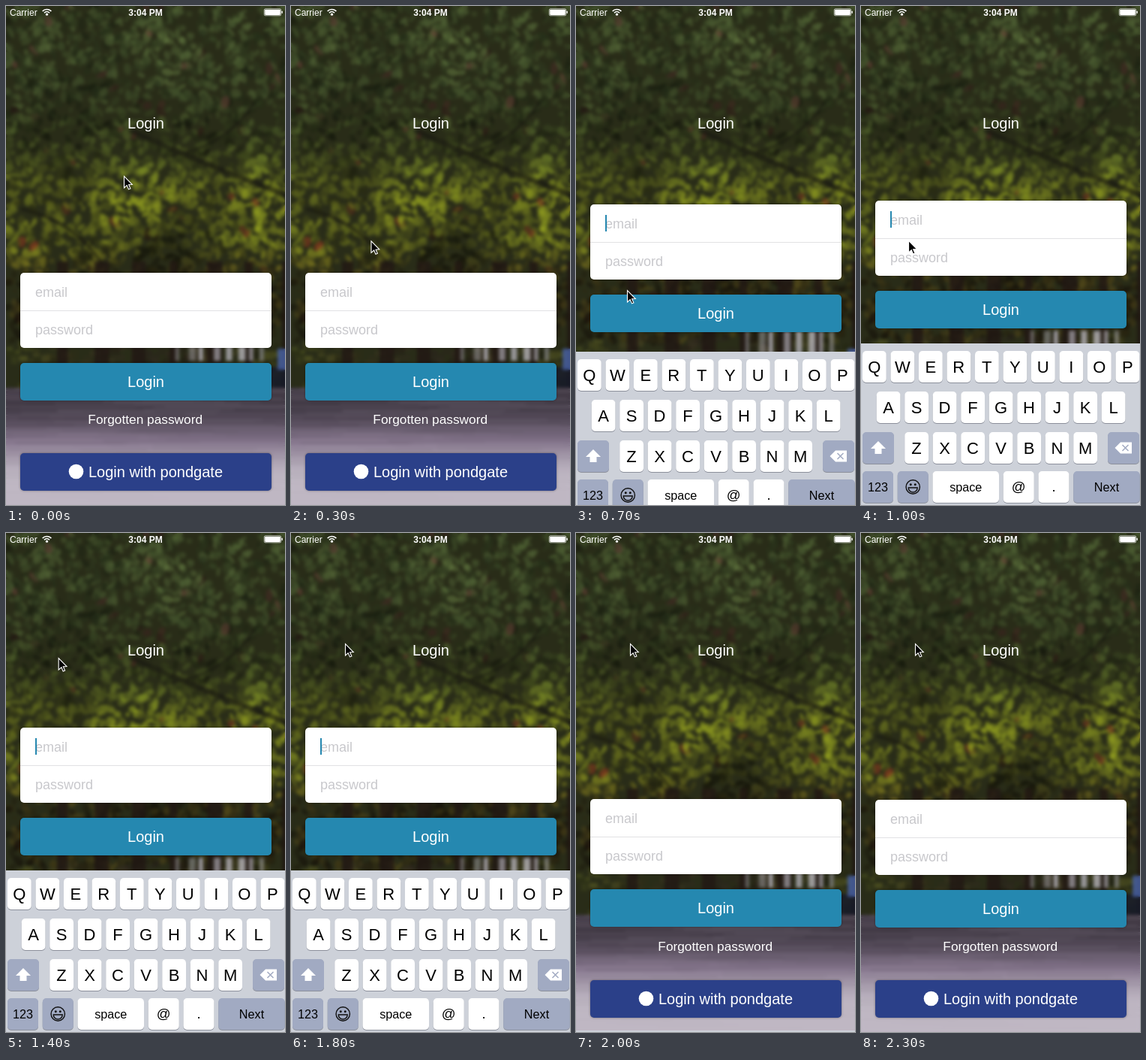
An HTML page with a canvas that plays this animation: 372 px wide and 664 px high, repeating every 2400 ms.

```html
<!DOCTYPE html>
<html lang="en">
<head>
<meta charset="utf-8">
<title>Login screen</title>
<style>
html, body { margin: 0; width: 100%; height: 100%; overflow: hidden; background: #2b3420; }
canvas { display: block; width: 372px; height: 664px; }
</style>
</head>
<body>
<canvas id="stage" width="372" height="664"></canvas>
<script>
const W = 372, H = 664, LOOP = 2400, STEP = 100;
const FONT = '"Liberation Sans", Arial, sans-serif';
const BLUE = '#2588b0', DIM = '#a1aac2';
const ctx = document.getElementById('stage').getContext('2d');

const clamp = v => Math.min(1, Math.max(0, v));
const smooth = v => (v = clamp(v)) * v * (3 - 2 * v);
const hsl = (h, s, l) => `hsl(${h} ${s}% ${l}%)`;

function random(seed) {
  return () => {
    seed = (seed * 1664525 + 1013904223) >>> 0;
    return seed / 4294967296;
  };
}

// ---------- backdrop: blurred trees over a street ----------
function newLayer() {
  const cv = document.createElement('canvas');
  cv.width = W;
  cv.height = H;
  return cv;
}

// Places that catch light (positive) or lie in shade (negative).
const SPOTS = [
  [210, 62, .3], [310, 40, .12], [45, 60, .1], [162, 262, .5], [228, 250, .3],
  [328, 245, .4], [20, 310, .25], [348, 310, .3],
  [85, 150, -.2], [270, 180, -.2], [215, 325, -.4]
];
function lightAt(x, y) {
  return SPOTS.reduce((sum, [sx, sy, amount]) =>
    sum + amount * Math.exp(-((x - sx) ** 2 + (y - sy) ** 2) / 2200),
    .4 - .2 * smooth((y - 320) / 60));
}

function paintLeaves(g, rnd) {
  for (let i = 0; i < 2600; i++) {
    const x = rnd() * W, y = rnd() * 445;
    const low = smooth((y - 110) / 150);
    const v = clamp(lightAt(x, y) + (rnd() - .5) * .65);
    const hue = rnd() < .015 ? 12 : 84 - 18 * low - 16 * smooth((y - 310) / 60);
    g.fillStyle = hsl(hue, 30 + 32 * low * v + 6 * low, 6 + 32 * v);
    g.globalAlpha = .6;
    g.beginPath();
    g.ellipse(x, y, 3 + rnd() * 6, 2 + rnd() * 4, rnd() * 3, 0, 7);
    g.fill();
  }
}

function paintBranch(g, x1, y1, cx, cy, x2, y2, width) {
  g.globalAlpha = .6;
  g.strokeStyle = '#17140f';
  g.lineWidth = width;
  g.beginPath();
  g.moveTo(x1, y1);
  g.quadraticCurveTo(cx, cy, x2, y2);
  g.stroke();
}

function paintStreet(g, rnd) {
  // hedges, then trunks
  for (let i = 0; i < 300; i++) {
    const x = rnd() * W, y = 435 + rnd() * 70;
    const edge = Math.abs(x / W - .5) * 2;
    g.globalAlpha = .5;
    g.fillStyle = hsl(30 + 38 * edge, 20 + 25 * edge, 8 + rnd() * (8 + 14 * edge));
    g.fillRect(x, y, 6 + rnd() * 10, 4 + rnd() * 7);
  }
  g.fillStyle = '#211713';
  g.globalAlpha = .8;
  for (let x = 68; x < W; x += 50) g.fillRect(x, 340, 10 + rnd() * 12, 168);

  // pale shop fronts and parked cars
  g.fillStyle = '#c3c0cc';
  for (let x = 225; x < 350; x += 16) {
    g.globalAlpha = .35 + rnd() * .5;
    g.fillRect(x + rnd() * 6, 432, 4 + rnd() * 6, 40);
  }
  for (let x = 85; x < 290; x += 52) {
    g.globalAlpha = .5;
    g.fillStyle = hsl(265, 6, 42 + rnd() * 22);
    g.beginPath();
    g.roundRect(x, 489 + rnd() * 5, 42, 17, 7);
    g.fill();
  }
  g.globalAlpha = .85;
  g.fillStyle = '#171a2a';
  g.fillRect(338, 480, 40, 58);
  g.fillStyle = '#465fa0';
  g.fillRect(362, 456, 10, 28);
}

function paintRoad(g, rnd) {
  const top = 508;
  for (let y = top; y < H; y++) {
    const k = (y - top) / (H - top);
    const shade = 25 + 49 * smooth((k - .1) / .7);
    g.globalAlpha = 1;
    g.fillStyle = hsl(280, 9, shade);
    g.fillRect(0, y, W, 1);
    g.globalAlpha = .22 * (1 - k);
    g.fillStyle = rnd() < .5 ? '#1b161b' : '#c8bccd';
    g.fillRect(rnd() * W - 120, y, 120 + rnd() * 160, 2 + rnd() * 3);
  }
}

function makeBackdrop() {
  const raw = newLayer(), out = newLayer();
  const g = raw.getContext('2d'), o = out.getContext('2d');
  const rnd = random(11);
  g.fillStyle = '#292c18';
  g.fillRect(0, 0, W, H);
  paintLeaves(g, rnd);
  paintBranch(g, 165, 165, 250, 205, 375, 252, 7);
  paintBranch(g, 215, 200, 290, 190, 330, 130, 3);
  paintBranch(g, 20, 270, 90, 285, 130, 345, 4);
  paintStreet(g, rnd);
  paintRoad(g, rnd);
  o.drawImage(raw, 0, 0);
  o.filter = 'blur(2px)';
  o.drawImage(raw, 0, 0);
  return out;
}

// ---------- drawing helpers ----------
function box(x, y, w, h, r, color) {
  ctx.fillStyle = color;
  ctx.beginPath();
  ctx.roundRect(x, y, w, h, r);
  ctx.fill();
}
function panel(y, h, color) {
  ctx.shadowColor = 'rgba(0, 0, 0, .4)';
  ctx.shadowBlur = 3;
  box(19, y, 335, h, 5, color);
  ctx.shadowBlur = 0;
  ctx.shadowColor = 'transparent';
}
function label(text, x, y, size, color, align = 'center', weight = '') {
  ctx.font = `${weight} ${size}px ${FONT}`;
  ctx.fillStyle = color;
  ctx.textAlign = align;
  ctx.fillText(text, x, y);
}
function poly(points, x, y) {
  ctx.beginPath();
  points.forEach(([dx, dy]) => ctx.lineTo(x + dx, y + dy));
  ctx.closePath();
}
function disc(x, y, r, color) {
  ctx.fillStyle = color;
  ctx.beginPath();
  ctx.arc(x, y, r, 0, 7);
  ctx.fill();
}

// ---------- interface ----------
function statusBar() {
  label('Carrier', 5, 12.5, 12, '#fff', 'left');
  label('3:04 PM', 186, 12.5, 12, '#fff', 'center', 'bold');
  ctx.strokeStyle = '#fff';
  ctx.lineWidth = 1.7;
  for (const r of [4.8, 8]) {
    ctx.beginPath();
    ctx.arc(54.5, 12.5, r, -Math.PI * .76, -Math.PI * .24);
    ctx.stroke();
  }
  disc(54.5, 11.2, 1.6, '#fff');
  ctx.lineWidth = .7;
  ctx.beginPath();
  ctx.roundRect(344.3, 3.8, 22.4, 9, 1.5);
  ctx.stroke();
  box(345.2, 4.7, 20.6, 7.2, .8, '#fff');
  box(367.4, 6.6, 1.4, 3.4, .7, '#fff');
}

function form(y, focused) {
  panel(y, 100, '#fff');
  ctx.fillStyle = '#e2e2e4';
  ctx.fillRect(19, y + 50, 335, 1);
  label('email', 39, y + 31.5, 18, '#c8c8cc', 'left');
  label('password', 39, y + 81.5, 18, '#c8c8cc', 'left');
  if (focused) {
    ctx.fillStyle = BLUE;
    ctx.fillRect(39, y + 14, 2, 22);
  }
  panel(y + 120, 50, BLUE);
  label('Login', 186.5, y + 152, 20, '#fff');
}

function footer() {
  label('Forgotten password', 185.7, 556, 17.3, '#fff');
  panel(595, 50, '#2b4089');
  disc(93.5, 619.5, 9.8, '#fff');
  label('Login with pondgate', 110, 627, 20, '#fff', 'left');
}

function key(x, y, w, color = '#fff') {
  box(x, y + 1, w, 42, 5, '#8c909b');
  box(x, y, w, 42, 5, color);
}

function keyboard(top) {
  const pitch = 37.5, gap = 5.75;
  ctx.fillStyle = '#cdd1d9';
  ctx.fillRect(0, top, W, H - top);

  ['QWERTYUIOP', 'ASDFGHJKL', 'ZXCVBNM'].forEach((row, r) => {
    const y = top + 10 + r * 54;
    [...row].forEach((ch, i) => {
      const x = 189.5 + (i - row.length / 2) * pitch;
      key(x, y, pitch - gap);
      label(ch, x + 15.8, y + 29, 22, '#000');
    });
  });
  shiftKey(2, top + 118);
  deleteKey(329, top + 118);

  const y = top + 170;
  let x = 2;
  for (const text of ['123', '', 'space', '@', '.', 'Next']) {
    const wide = text.length > 3;
    const w = wide ? 88.5 : 41;
    const grey = ['123', '', 'Next'].includes(text);
    key(x, y, w, grey ? DIM : '#fff');
    if (text) label(text, x + w / 2, y + 26.5, text.length > 1 ? 16.2 : 18.5, '#000');
    else smiley(x + w / 2, y + 21);
    x += w + gap;
  }
}

function shiftKey(x, y) {
  key(x, y, 42, DIM);
  poly([[21, 12], [31, 22], [11, 22]], x, y);
  ctx.fillStyle = '#fff';
  ctx.fill();
  ctx.fillRect(x + 16.5, y + 21.5, 9, 7.5);
}

function deleteKey(x, y) {
  key(x, y, 42, DIM);
  poly([[9.5, 21], [17, 13.5], [32, 13.5], [32, 28.5], [17, 28.5]], x, y);
  ctx.fillStyle = '#fff';
  ctx.fill();
  ctx.strokeStyle = DIM;
  ctx.lineWidth = 1.5;
  ctx.beginPath();
  for (const s of [-4, 4]) {
    ctx.moveTo(x + 19.5, y + 21 - s);
    ctx.lineTo(x + 27.5, y + 21 + s);
  }
  ctx.stroke();
}

function smiley(x, y) {
  ctx.strokeStyle = '#111';
  ctx.lineWidth = 1.4;
  ctx.beginPath();
  ctx.arc(x, y, 9.2, 0, 7);
  ctx.stroke();
  ctx.beginPath();
  ctx.arc(x, y + 1, 6, 0, Math.PI);
  ctx.closePath();
  ctx.stroke();
  for (const dx of [-3, 3]) disc(x + dx, y - 3.2, 1.5, '#111');
}

function pointer([x, y]) {
  poly([[0, 0], [0, 15.5], [3.7, 12.2], [6, 17.4], [8.4, 16.4], [6.1, 11.3], [10.8, 11]],
    x + .5, y + .5);
  ctx.fillStyle = '#000';
  ctx.fill();
  ctx.strokeStyle = '#fff';
  ctx.lineWidth = 1.1;
  ctx.stroke();
}

// ---------- motion ----------
function spring(ms) {
  const x = Math.max(0, ms) * .045;
  return 1 - (1 + x) * Math.exp(-x);
}
function pointerAt(t) {
  const go = smooth(t / 550), back = smooth((t - 700) / 850);
  return [
    157 - 89 * go + 4 * back - 7.8 * Math.sin(Math.PI * back),
    226 + 152 * go - 231 * back
  ];
}

const backdrop = makeBackdrop();

function draw(t) {
  const up = spring(t - 596) - spring(t - 1853);
  ctx.drawImage(backdrop, 0, 0);
  statusBar();
  label('Login', 186.5, 163, 20, '#fff');
  footer();
  form(Math.round((355 - 96 * up) * 2) / 2, t >= 700 && t < 1900);
  if (up > .001) keyboard(Math.round(H - 215 * up));
  pointer(pointerAt(t));
}

const start = performance.now();
function tick() {
  const t = (performance.now() - start) % LOOP;
  draw(Math.floor(t / STEP) * STEP);
  requestAnimationFrame(tick);
}
tick();
</script>
</body>
</html>
```
